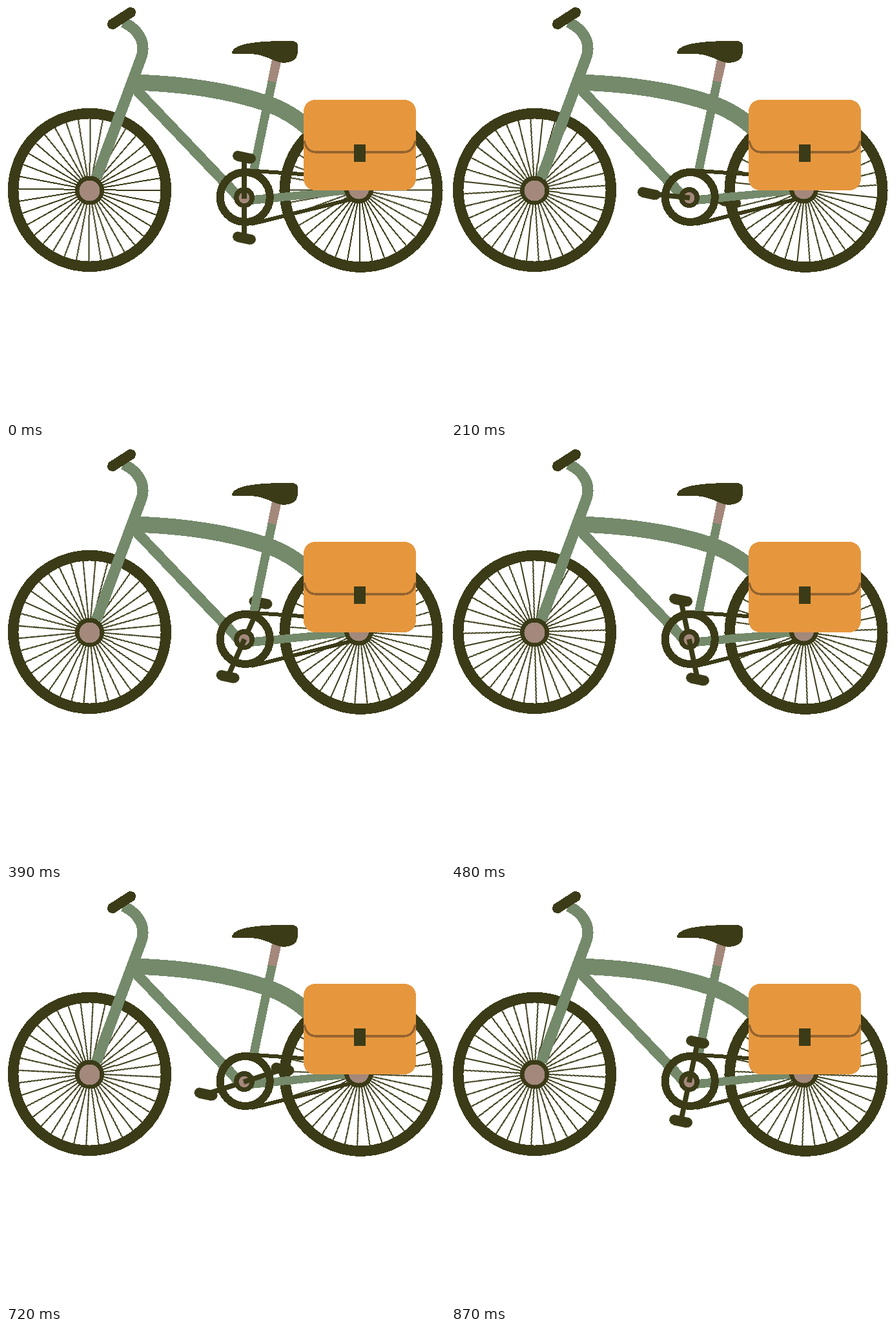
Animation, 680 px wide and 640 px high, one loop 0.9 s. Source, as an HTML page:

```html
<!DOCTYPE html>
<html lang="en">
<head>
<meta charset="utf-8">
<title>Bicycle</title>
<style>
  html, body { margin: 0; width: 100%; height: 100%; overflow: hidden; background: #fff; }
  svg { display: block; width: 680px; height: 640px; }
  .dark { fill: #3b3b18; }
  .pink { fill: #a3887b; }
  .line { fill: none; stroke: #3b3b18; }
  .tube { fill: none; stroke: #748a6b; }
  .spin { animation: spin .9s steps(30) infinite; }
  .level { animation: spin .9s steps(30) infinite reverse; }
  @keyframes spin { to { transform: rotate(-360deg); } }
</style>
</head>
<body>
<svg viewBox="0 0 680 640" shape-rendering="crispEdges">
  <!-- wheels -->
  <g transform="translate(129.5 284)"><g class="spin spokes" data-tilt="0.7"></g></g>
  <g transform="translate(548 284.5)"><g class="spin spokes" data-tilt="0"></g></g>
  <g class="line" stroke-width="16.5">
    <circle cx="129.5" cy="284.5" r="118.3"/>
    <circle cx="550" cy="285.3" r="118.3"/>
  </g>

  <g class="crank" data-turn="180"></g>

  <!-- frame -->
  <path class="pink" d="M412 82 L426.500 85 L419 118 L405 118 Z"/>
  <path class="tube" stroke-width="13.5" d="M412.200 117 L383.500 255"/>
  <path class="tube" stroke-width="16" d="M200 127.500 L362 297"/>
  <path class="tube" stroke-width="25" d="M200 118 C290 121 355 134 405 151 C430 160 450 172 470 190"/>
  <path fill="#748a6b" d="M370 294 L540 279 L540 290 L370 308 Z"/>
  <path class="tube" stroke-width="17" d="M182 25 C205 36 217 56 210 78 L140 266"/>
  <path class="line" stroke-width="16" stroke-linecap="round" d="M165 28 L193 10"/>
  <path class="dark" d="M350 71 C354 61 372 57 400 55 C416 54 432 54 444 54 Q452 55 452 62 V73 C451 83 441 88 430 88 C414 87 406 76 380 74 L353 74 Q349 74 350 71 Z"/>

  <!-- drivetrain and hubs -->
  <path class="line" stroke-width="6" d="M370 254 L400 256 L546 266 M380 337 L546 296"/>
  <circle class="dark" cx="129.5" cy="285" r="22.5"/>
  <circle class="pink" cx="129.5" cy="285.500" r="16"/>
  <circle class="dark" cx="546.5" cy="283" r="22.5"/>
  <circle class="pink" cx="546.5" cy="283" r="15.5"/>
  <circle class="line" stroke-width="12" cx="370.3" cy="295.500" r="38.5"/>
  <circle class="dark" cx="369" cy="296" r="16"/>
  <circle class="pink" cx="369" cy="296.500" r="8.5"/>

  <g class="crank" data-turn="0"></g>

  <!-- bag -->
  <rect x="461" y="145" width="174" height="140" rx="18" fill="#e6973e"/>
  <path fill="none" stroke="#95642f" stroke-width="3.500" d="M462 208 C464 220 471 226 481 226 H615 C625 226 632 220 634 208"/>
  <rect class="dark" x="539" y="214" width="18" height="27"/>
</svg>
<script>
  const add = (parent, tag, attrs) => {
    const el = document.createElementNS('http://www.w3.org/2000/svg', tag);
    for (const key in attrs) el.setAttribute(key, attrs[key]);
    return parent.appendChild(el);
  };

  for (const wheel of document.querySelectorAll('.spokes')) {
    for (let i = 0; i < 36; i++) {
      add(wheel, 'line', {
        class: 'line', 'stroke-width': 2, y1: -18, y2: -112,
        transform: `rotate(${i * 10 + +wheel.dataset.tilt})`
      });
    }
  }

  // The arm turns while its pedal stays level.
  for (const crank of document.querySelectorAll('.crank')) {
    const turn = +crank.dataset.turn;
    crank.setAttribute('transform', 'translate(369 296.5)');
    const arm = add(add(crank, 'g', { class: 'spin' }), 'g', { transform: `rotate(${turn})` });
    add(arm, 'rect', { class: 'dark', x: -4, y: -62, width: 8, height: 62.5 });
    const hinge = add(arm, 'g', { transform: `translate(0 -62.5) rotate(${-turn})` });
    const pedal = add(hinge, 'g', { class: 'level' });
    add(pedal, 'rect', { class: 'dark', x: -18, y: -8, width: 36, height: 15.5, rx: 7.5 });
  }
</script>
</body>
</html>
```
